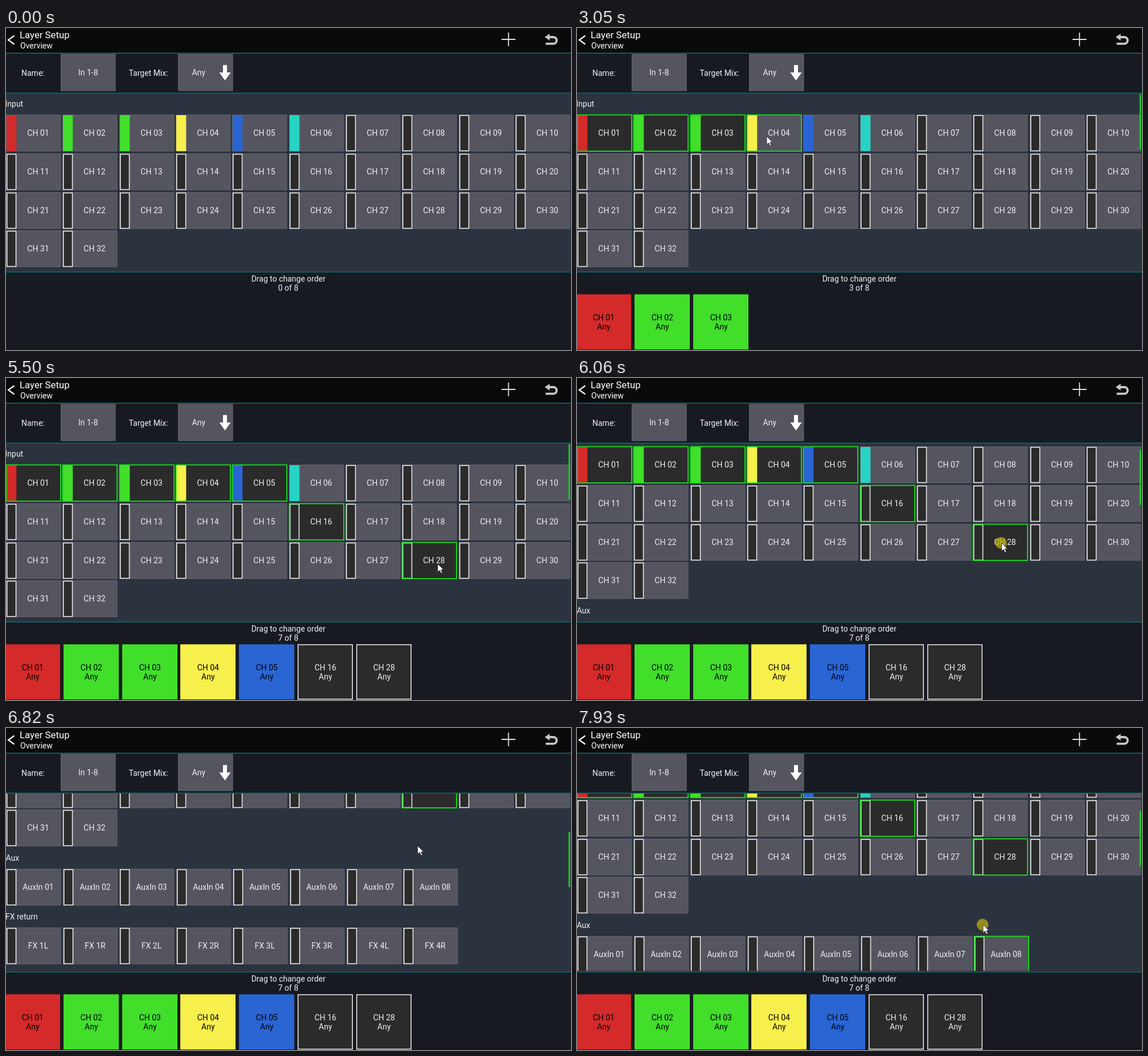
Recreate the animation shown at these times as an HTML page. Size 992x565 px, loop 8 s.

```html
<!DOCTYPE html>
<html lang="en">
<head>
<meta charset="utf-8">
<title>Layer Setup</title>
<style>
html, body { margin: 0; width: 100%; height: 100%; overflow: hidden; background: #171a21; }
svg { display: block; width: 100%; height: 100%; }
text { font: 14px Roboto, sans-serif; fill: #f0f0f0; }
.mid { text-anchor: middle; }
</style>
</head>
<body>
<svg id="stage" viewBox="0 0 992 565">
  <defs><clipPath id="view"><rect y="115" width="992" height="311"/></clipPath></defs>
</svg>
<script>
const LOOP = 8000, STEP = 78.4;
const ENTER = 620, REST = 200, PACE = 3, SLOP = 17;
const TILE = '#555560', DARK = '#2b2b2b', WHITE = '#f0f0f0', GREEN = '#14de18', TEAL = '#0f6a70';
const COLORS = ['#d42a2a', '#41de2a', '#41de2a', '#f7ef4b', '#2a65d4', '#27d3c3'];

// the pointer arrives, the tile gets a border, and is chosen after REST
const CLICKS = [
  { name: 'CH 01', at: 1360, x: 40, y: 190 },
  { name: 'CH 02', at: 1900, x: 137, y: 190 },
  { name: 'CH 03', at: 2390, x: 235, y: 190 },
  { name: 'CH 04', at: 2900, x: 333, y: 190 },
  { name: 'CH 05', at: 3440, x: 435, y: 193 },
  { name: 'CH 16', at: 4040, x: 537, y: 253 },
  { name: 'CH 28', at: 5040, x: 758, y: 326 }
];
const DRAGS = [
  { at: 5900, end: 6360, from: [750, 338], to: [729, 109] },
  { at: 7040, end: 7301, from: [718, 282], to: [714, 389], name: 'AuxIn 08' },
  { at: 7690, end: 7920, from: [712, 300], to: [713, 345] }
];

const stage = document.getElementById('stage');

function add(parent, tag, attrs, content) {
  const el = document.createElementNS('http://www.w3.org/2000/svg', tag);
  for (const k in attrs) el.setAttribute(k, attrs[k]);
  if (content) el.textContent = content;
  parent.appendChild(el);
  return el;
}
const rect = (parent, x, y, width, height, fill, stroke = 'none', line = 0) =>
  add(parent, 'rect', { x, y, width, height, fill, stroke, 'stroke-width': line });
const label = (parent, x, y, str, more) => add(parent, 'text', { x, y, ...more }, str);
const mid = { class: 'mid' };
const show = (el, on) => el.setAttribute('visibility', on ? 'visible' : 'hidden');
const pad = n => String(n).padStart(2, '0');

// fixed parts
rect(stage, 0, 0, 992, 565, '#171a21');
rect(stage, 0, 0, 992, 43, '#0a0a0a');
rect(stage, 0, 115, 992, 313, '#2b333f');
for (const y of [43.5, 113.5, 427.5]) rect(stage, 0, y, 992, 1.5, TEAL);
add(stage, 'path', { d: 'M14.5 13.5L4 21L14.5 28.5', fill: 'none', stroke: '#fff', 'stroke-width': 2.2 });
label(stage, 24, 17.5, 'Layer Setup', { style: 'font-size:16.8px;fill:#fff' });
label(stage, 25, 36, 'Overview', { style: 'fill:#fff' });
add(stage, 'path', { d: 'M870 20H894.5M882.3 8V32', stroke: '#e4e4e4', 'stroke-width': 1.8 });
add(stage, 'path', { d: 'M953 16H961a5.8 5.8 0 0 1 0 11.6H947.5', fill: 'none', stroke: '#c8c8c8', 'stroke-width': 3.8 });
add(stage, 'path', { d: 'M945.8 16L954.5 10V22Z', fill: '#c8c8c8' });
label(stage, 27, 84, 'Name:');
label(stage, 215.5, 84, 'Target Mix:');
for (const x of [96.5, 302.5]) rect(stage, x, 46, 95.5, 64, TILE, '#666670', 1);
label(stage, 144.3, 83, 'In 1-8', mid);
label(stage, 338.3, 83, 'Any', mid);
add(stage, 'path', { d: 'M381 65H388V78H394.5L384.5 92L374.5 78H381Z', fill: '#fff' });
label(stage, 495.8, 445, 'Drag to change order', mid);
const count = label(stage, 495.5, 461, '0 of 8', mid);

// scrolling list
const view = add(stage, 'g', { 'clip-path': 'url(#view)' });
const list = add(view, 'g', {});
const tiles = {};

function addTile(name, left, top, color) {
  const x = Math.round(left), y = Math.round(top);
  const face = rect(list, x + 0.5, y + 0.5, 95.5, 63.5, TILE, '#63636d', 1);
  if (color) rect(list, x + 1, y + 1, 17.3, 63, color);
  else rect(list, x + 1.75, y + 1.5, 15.8, 62, DARK, WHITE, 1.5);
  label(list, x + 56.5, y + 37, name, mid);
  const frame = rect(list, x + 0.5, y + 0.5, 95.5, 63.7, 'none', GREEN, 1.8);
  tiles[name] = { face, frame };
}

label(list, -1.5, 138, 'Input');
for (let i = 0; i < 32; i++)
  addTile('CH ' + pad(i + 1), (i % 10) * 99.35, 152 + Math.floor(i / 10) * 67.8, COLORS[i]);
label(list, -0.5, 445, 'Aux');
label(list, -1, 548, 'FX return');
for (let i = 0; i < 8; i++) {
  addTile('AuxIn ' + pad(i + 1), i * 99.6, 459);
  addTile('FX ' + (1 + (i >> 1)) + 'LR'[i % 2], i * 99.6, 562);
}
const bar = rect(stage, 987.8, 116, 2.5, 97, GREEN);

// chosen tiles along the bottom
const cards = CLICKS.map(({ name }, i) => {
  const g = add(stage, 'g', {}), x = Math.round(i * 102.75 - 2), plain = i > 4;
  const ink = { class: 'mid', style: 'fill:' + (plain ? WHITE : '#000') };
  if (plain) rect(g, x + 0.75, 468, 95.5, 95.5, DARK, WHITE, 1.5);
  else rect(g, x, 467.3, 97, 96.7, COLORS[i]);
  label(g, x + 48.8, 513, name, ink);
  label(g, x + 48.8, 529, 'Any', ink);
  return g;
});

const pointer = add(stage, 'g', {});
const touch = add(pointer, 'circle', { cx: -1, r: 10.3, fill: '#beb20f', 'fill-opacity': 0.72 });
add(pointer, 'path', {
  d: 'M0 0V14.5L3.4 11.4L5.9 16.8L8.2 15.7L5.8 10.6H10.3Z',
  fill: '#fff', stroke: '#222', 'stroke-width': 0.8
});

// pointer legs: travel time grows with distance, after a rest at each stop
const legs = [];
let spot = [846, 545], free = ENTER;
function travel(to, end, begin) {
  const far = Math.hypot(to[0] - spot[0], to[1] - spot[1]);
  legs.push({ begin: begin ?? Math.max(free, end - far * PACE), end, from: spot, to });
  spot = to;
  free = end + REST;
}
for (const c of CLICKS) travel([c.x, c.y], c.at);
for (const d of DRAGS) {
  travel(d.from, d.at);
  travel(d.to, d.end, d.at);
}

function progress(t, begin, end) {
  const u = Math.min(1, Math.max(0, (t - begin) / (end - begin)));
  return u * u * (3 - 2 * u);
}

function pointerAt(t) {
  const leg = legs.findLast(l => t >= l.begin) || legs[0];
  const k = progress(t, leg.begin, leg.end);
  return leg.from.map((v, i) => v + (leg.to[i] - v) * k);
}

function scrollAt(t) {
  return DRAGS.reduce((sum, d) => {
    const moved = (d.to[1] - d.from[1]) * progress(t, d.at, d.end);
    return sum - Math.sign(moved) * Math.max(0, Math.abs(moved) - SLOP);
  }, 0);
}

function draw(time) {
  const t = Math.floor((time % LOOP + 12) / STEP) * STEP;
  const [x, y] = pointerAt(t), scroll = scrollAt(t);
  const chosen = CLICKS.filter(c => t >= c.at + REST).length;
  CLICKS.forEach((c, i) => {
    tiles[c.name].face.setAttribute('fill', i < chosen ? DARK : TILE);
    show(cards[i], i < chosen);
  });
  for (const name in tiles)
    show(tiles[name].frame, [...CLICKS, ...DRAGS].some(a => a.name === name && t >= a.at));
  count.textContent = chosen + ' of 8';
  list.setAttribute('transform', `translate(0 ${-Math.round(scroll)})`);
  bar.setAttribute('y', 116 + scroll * 0.3125);
  show(bar, chosen > 0);
  pointer.setAttribute('transform', `translate(${x} ${y})`);
  show(pointer, t >= ENTER);
  show(touch, t >= ENTER && DRAGS.some(d => t >= d.at && t <= d.end + REST));
}

const begin = performance.now();
function tick() {
  draw(performance.now() - begin);
  requestAnimationFrame(tick);
}
tick();
</script>
</body>
</html>
```
